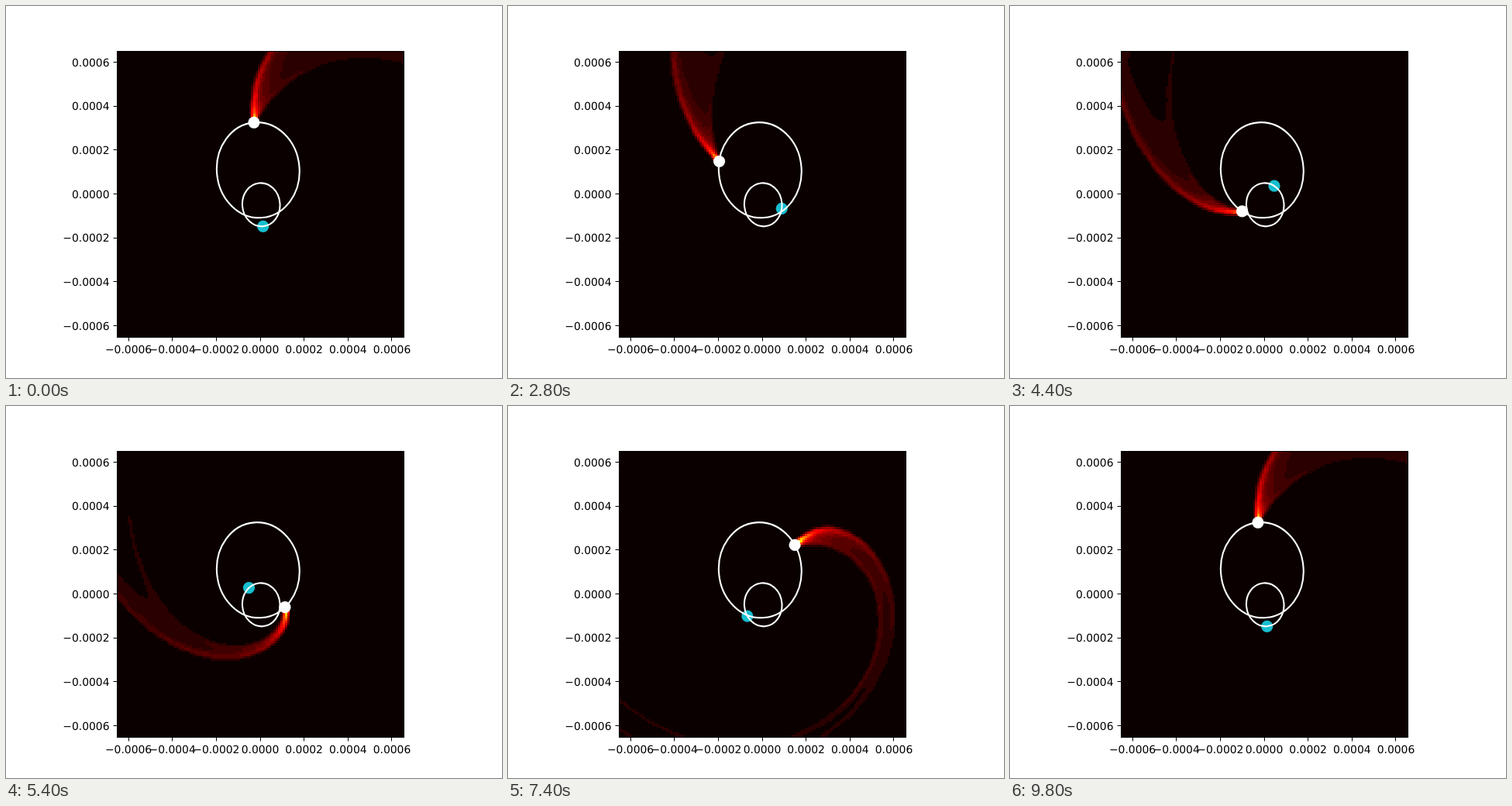
Animation of 640 by 480 pixels, one loop 10 s. Source, as an HTML page with a canvas:

```html
<!DOCTYPE html>
<html lang="en">
<head>
<meta charset="utf-8">
<title>Binary orbit with a dust plume</title>
<style>
  html, body { margin: 0; width: 100%; height: 100%; overflow: hidden; background: #fff; }
  canvas { position: absolute; left: 143px; top: 58px; width: 370px; height: 369px; image-rendering: pixelated; }
  svg { position: absolute; left: 0; top: 0; }
  text { font: 13.89px "DejaVu Sans", sans-serif; text-rendering: geometricPrecision; }
</style>
</head>
<body>
<canvas id="plume" width="128" height="128"></canvas>
<svg id="chart" width="640" height="480" viewBox="0 0 640 480">
  <g id="axes" stroke="#000" fill="none">
    <rect x="143.5" y="58.5" width="370" height="369"/>
  </g>
  <g id="labels"></g>
  <circle id="companion" r="7.6" fill="#17becf"/>
  <circle id="star" r="7.6" fill="#fff"/>
  <g id="orbits" fill="none" stroke="#fff" stroke-width="2.08"></g>
</svg>
<script>
const STEP_MS = 200, STEPS = 50;
const LEFT = 143.2, TOP = 57.6, SIZE = 369.6, CELLS = 128;
const CX = 328, CY = 242.4;                 // barycentre
const SEMI_MAJOR = 61.6, ECC = 0.5, SEMI_MINOR = SEMI_MAJOR * Math.sqrt(1 - ECC * ECC);
const TILT = 5 * Math.PI / 180, MASS_RATIO = 0.455;
const HALF_ANGLE = 20 * Math.PI / 180;
const MAX_AGE = 2.7, AGES = 3200, RING = 64;
const LEADING_BIAS = 0.6;                   // the leading wall of the cone holds more dust
const GAIN = 68, LEVEL = 0.034;

const byId = id => document.getElementById(id);

function add(parent, name, attrs, text = "") {
  const node = document.createElementNS("http://www.w3.org/2000/svg", name);
  for (const key in attrs) node.setAttribute(key, attrs[key]);
  node.textContent = text;
  byId(parent).append(node);
}

// Axis ticks and labels
for (let i = -3; i <= 3; i++) {
  const x = CX + i * 56.65, y = CY - i * 56.65;
  const label = (i < 0 ? "\u2212" : "") + Math.abs(i * 0.0002).toFixed(4);
  add("axes", "path", { d: `M${Math.floor(x) + 0.5} 427.5v5M143.5 ${Math.floor(y) + 0.5}h-5` });
  add("labels", "text", { x, y: 448, "text-anchor": "middle" }, label);
  add("labels", "text", { x: 133.5, y: Math.round(y + 5.3), "text-anchor": "end" }, label);
}

// Orbits share a focus at the barycentre
for (const scale of [1, -MASS_RATIO]) {
  const up = SEMI_MAJOR * ECC * scale;
  add("orbits", "ellipse", {
    rx: SEMI_MINOR * Math.abs(scale), ry: SEMI_MAJOR * Math.abs(scale),
    transform: `translate(${CX - up * Math.sin(TILT)} ${CY - up * Math.cos(TILT)}) rotate(${-TILT * 180 / Math.PI})`
  });
}

// Star offset from the barycentre; the mean anomaly counts from apoastron
function starAt(mean) {
  let E = mean;
  for (let i = 0; i < 6; i++) E -= (E + ECC * Math.sin(E) - mean) / (1 + ECC * Math.cos(E));
  const up = SEMI_MAJOR * (Math.cos(E) + ECC), side = SEMI_MINOR * Math.sin(E);
  return [-up * Math.sin(TILT) - side * Math.cos(TILT),
          -up * Math.cos(TILT) + side * Math.sin(TILT)];
}

const ring = Array.from({ length: RING }, (_, j) => {
  const c = Math.cos((j + 0.5) / RING * Math.PI);
  return { offset: Math.sin(HALF_ANGLE) * c, weight: 1 - LEADING_BIAS * c };
});

const ctx = byId("plume").getContext("2d");
const image = ctx.createImageData(CELLS, CELLS);

// Each instant emits a hollow cone of dust pointing away from the companion
function dustDensity(mean) {
  const density = new Float32Array(CELLS * CELLS);
  const mass = MAX_AGE / AGES / RING, toCell = CELLS / SIZE;
  for (let i = 0; i < AGES; i++) {
    const age = (i + 0.5) / AGES * MAX_AGE;
    const [px, py] = starAt(mean - age);
    const r = Math.hypot(px, py), dx = px / r, dy = py / r;
    const reach = (102 + 0.18 * r) * age;
    const x0 = CX + px + reach * Math.cos(HALF_ANGLE) * dx - LEFT;
    const y0 = CY + py + reach * Math.cos(HALF_ANGLE) * dy - TOP;
    for (const { offset, weight } of ring) {
      const col = Math.floor((x0 - reach * offset * dy) * toCell);
      const row = Math.floor((y0 + reach * offset * dx) * toCell);
      if (col >= 0 && col < CELLS && row >= 0 && row < CELLS) density[row * CELLS + col] += mass * weight;
    }
  }
  return density;
}

// Smooths along one axis and swaps the axes, so two passes restore the layout
function smoothAndTranspose(grid) {
  const result = new Float32Array(grid.length);
  for (let row = 0; row < CELLS; row++) {
    for (let col = 0; col < CELLS; col++) {
      const at = c => grid[row * CELLS + Math.max(0, Math.min(CELLS - 1, c))];
      result[col * CELLS + row] = (at(col - 1) + 2 * at(col) + at(col + 1)) / 4;
    }
  }
  return result;
}

function paintPlume(density) {
  density.forEach((value, i) => {
    const level = Math.floor(value * GAIN / LEVEL);
    const heat = level ? Math.min(1, (level + 0.4) * LEVEL) : 0;
    image.data.set([
      255 * (0.0416 + 0.9584 * heat / 0.365),
      255 * (heat - 0.365) / 0.381,
      255 * (heat - 0.746) / 0.254,
      255
    ], i * 4);
  });
  ctx.putImageData(image, 0, 0);
}

function place(id, x, y) {
  byId(id).setAttribute("cx", CX + x);
  byId(id).setAttribute("cy", CY + y);
}

let shown = -1;
function draw() {
  const step = Math.floor(performance.now() / STEP_MS) % STEPS;
  if (step !== shown) {
    shown = step;
    const mean = step / (STEPS - 1) * 2 * Math.PI;
    const [x, y] = starAt(mean);
    paintPlume(smoothAndTranspose(smoothAndTranspose(dustDensity(mean))));
    place("star", x, y);
    place("companion", -x * MASS_RATIO, -y * MASS_RATIO);
  }
  requestAnimationFrame(draw);
}
draw();
</script>
</body>
</html>
```
